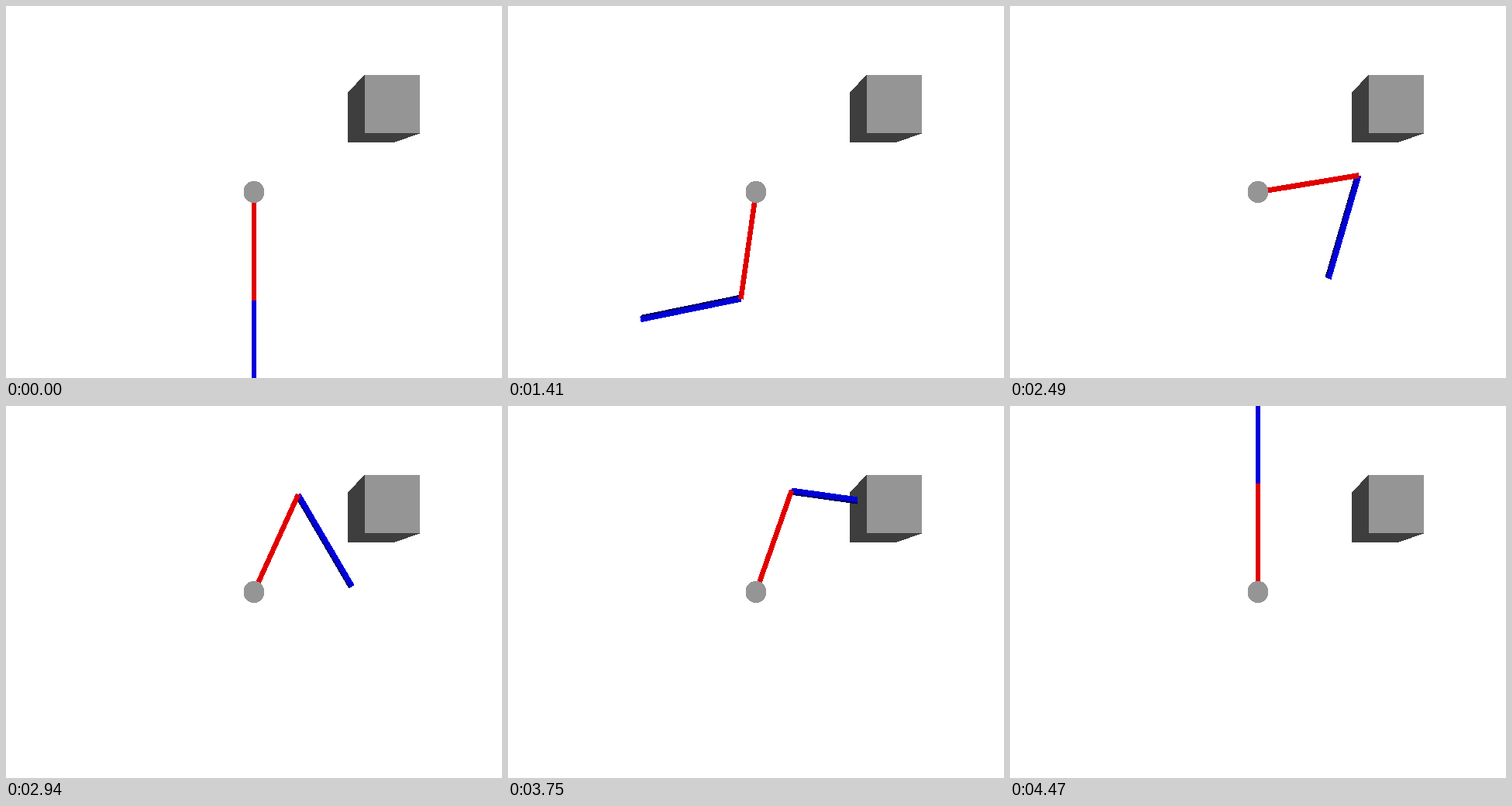
An HTML page that plays this animation: 640x480 px, repeating every 4.56 s.

```html
<!DOCTYPE html>
<html>
<head>
<meta charset="utf-8">
<style>
  html, body { margin: 0; width: 640px; height: 480px; overflow: hidden; background: #fff; }
  svg { display: block; shape-rendering: crispEdges; }
</style>
</head>
<body>
<svg id="stage" width="640" height="480"></svg>
<script>
const stage = document.getElementById('stage');
const LOOP = 4560, HOLD = 780, STEP = 90;
const CAMERA = 3, FOCAL_X = 392, FOCAL_Y = 415.7;
const HALF = 0.025; // half thickness of a link

// The arm wanders through [shoulder, elbow] angles in degrees, three steps per leg
const LEG = 3, MEETING = 27, LAST = 41;
const path = [
  [0, 0], [-20.7, -27.6], [-24, -54], [-0.8, -78.8], [11, -98.5],
  [42.2, -116.7], [76.5, -116], [110, -116], [146.9, -125.1], [169, -117],
  [183, -93], [159.6, -77.1], [173.6, -50], [187.6, -22.5], [176.2, 11.25]
];

function pose(step) {
  const i = Math.floor(step / LEG), f = step / LEG - i;
  return path[i].map((a, j) => (a + (path[i + 1][j] - a) * f) * Math.PI / 180);
}

function stepAt(t) {
  const n = t < HOLD ? 0 : 1 + Math.floor((t - HOLD) / STEP);
  return Math.min(LAST, n > MEETING ? n - 1 : n); // one beat of rest at the meeting point
}

const project = ([x, y], z) =>
  [320 + x * FOCAL_X / (CAMERA - z), 240 - y * FOCAL_Y / (CAMERA - z)];

const polygon = (points, color) => `<polygon points="${points.join(' ')}" fill="${color}"/>`;

// Extrudes a counterclockwise outline; only sides that face the camera are drawn
function prism(outline, back, front, color, shade) {
  const sides = outline.map((p, i) => {
    const q = outline[(i + 1) % outline.length];
    const visible = (q[0] - p[0]) * p[1] > (q[1] - p[1]) * p[0];
    return visible
      ? polygon([project(p, front), project(q, front), project(q, back), project(p, back)], shade)
      : '';
  });
  return sides.join('') + polygon(outline.map(p => project(p, front)), color);
}

const cube = back =>
  prism([[1, 0.5], [1.5, 0.5], [1.5, 1], [1, 1]], back, 0.25, '#959595', '#3e3e3e');

function link([x, y], angle, color, shade) {
  const dx = Math.sin(angle), dy = -Math.cos(angle);
  const corner = (along, side) =>
    [x + dx * along - dy * side * HALF, y + dy * along + dx * side * HALF];
  return prism([corner(0, -1), corner(1, -1), corner(1, 1), corner(0, 1)], -HALF, HALF, color, shade);
}

function draw() {
  const [shoulder, elbow] = pose(stepAt(performance.now() % LOOP));
  const joint = [Math.sin(shoulder), -Math.cos(shoulder)];
  stage.innerHTML =
    cube(-0.25) +
    link(joint, shoulder + elbow, '#0000d8', '#000058') +
    link([0, 0], shoulder, '#e00000', '#600000') +
    cube(0) + // the near half hides whatever reaches inside
    '<ellipse cx="320" cy="240" rx="13.5" ry="14.3" fill="#959595"/>';
  requestAnimationFrame(draw);
}
draw();
</script>
</body>
</html>
```
